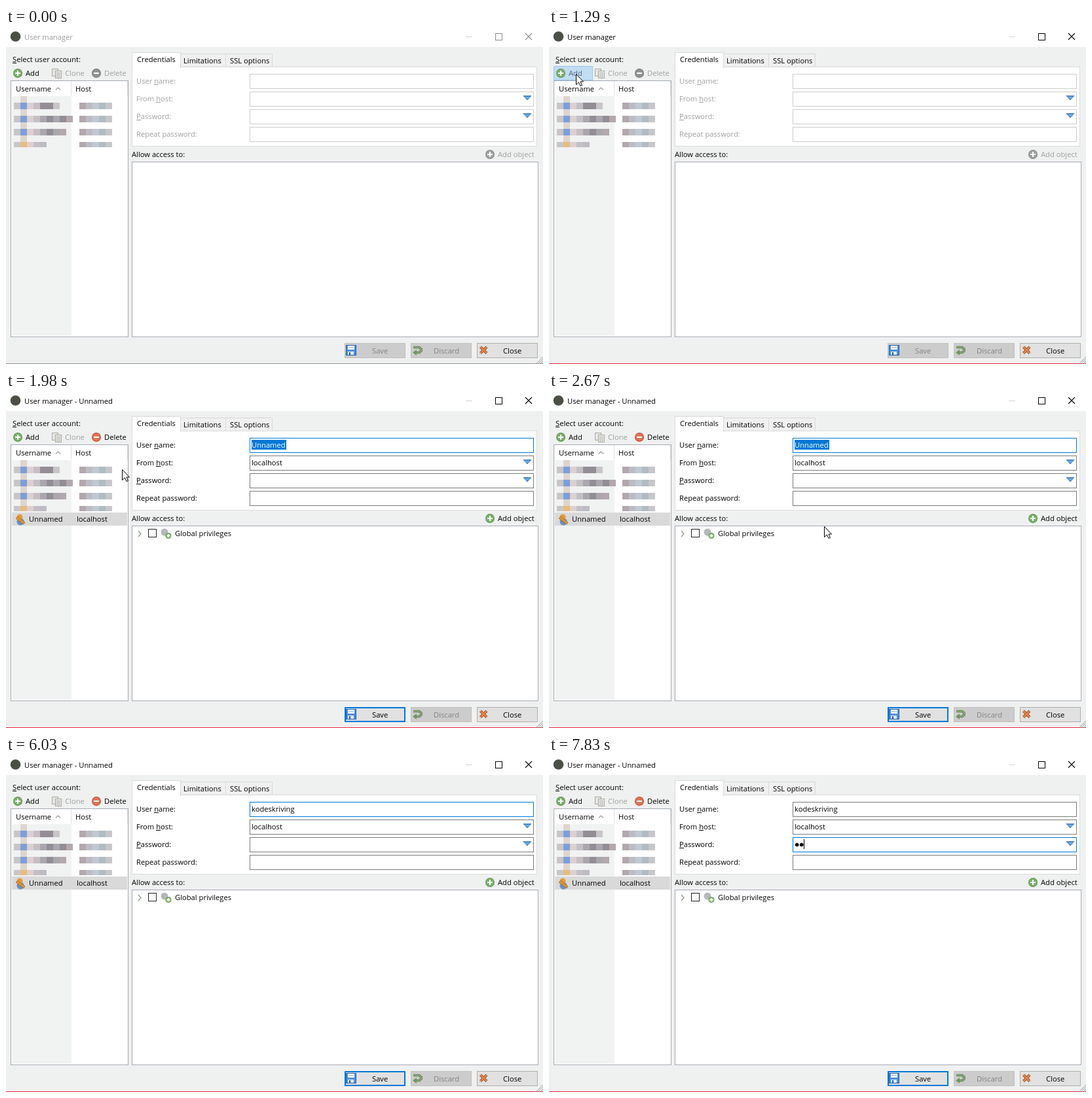
Animation of 820x513 px, one loop 8000 ms. Source, as an HTML page with a canvas:

```html
<!DOCTYPE html>
<html lang="en">
<head>
<meta charset="utf-8">
<title>User manager</title>
<style>
html, body { margin: 0; width: 820px; height: 513px; overflow: hidden; background: #eff0f0; }
canvas { display: block; }
</style>
</head>
<body>
<canvas id="stage" width="820" height="513"></canvas>
<script>
const c = document.getElementById('stage').getContext('2d');
const LOOP = 8000, ACTIVATE = 1210, ADDED = 1440, TO_HOST = 6410, TO_PASSWORD = 7130;
const BLUE = '#0078d7', BLACK = '#000', GRAY = '#a0a0a0';

// '<' is a backspace
const keys = 'kodeskir<<riving';
const keyTimes = [2900, 3070, 3220, 3450, 3600, 3850, 3920, 4150,
  4380, 4610, 4840, 5010, 5080, 5310, 5390, 5540];
const path = [[130, 684, 498], [750, 93, 80], [900, 70, 72], [980, 50, 70], [1060, 41, 70],
  [1650, 41, 70], [2210, 275, 153], [2600, 420, 205]];
const mosaic = { a: '#c9c5c7', b: '#7b9fdc', c: '#dfcfce', d: '#c3bfc5', e: '#938e96',
  f: '#aaa6ae', g: '#b3a8ae', h: '#bdbcc4', i: '#c2c8d2', j: '#b0bcc2', k: '#c6c6cb', o: '#e6bc82' };

const ramp = (t, from, length) => Math.min(1, Math.max(0, (t - from) / length));
const rgb = hex => [1, 3, 5].map(i => parseInt(hex.slice(i, i + 2), 16));
function mix(from, to, p) {
  const a = rgb(from), b = rgb(to);
  return `rgb(${a.map((v, i) => Math.round(v + (b[i] - v) * p))})`;
}
function rect(x, y, w, h, fill) {
  c.fillStyle = fill;
  c.fillRect(x, y, w, h);
}
function box(x, y, w, h, fill, border, line = 1) {
  rect(x, y, w, h, border);
  rect(x + line, y + line, w - 2 * line, h - 2 * line, fill);
}
function disc(x, y, r, fill) {
  c.fillStyle = fill;
  c.beginPath();
  c.arc(x, y, r, 0, 7);
  c.fill();
}
function poly(points, { fill, stroke, width = 1 }) {
  c.beginPath();
  points.forEach(([x, y]) => c.lineTo(x, y));
  if (fill) { c.closePath(); c.fillStyle = fill; c.fill(); }
  if (stroke) { c.strokeStyle = stroke; c.lineWidth = width; c.stroke(); }
}
// '_' underlines the next letter
function text(label, x, y, color = BLACK) {
  const at = label.indexOf('_'), plain = label.replace('_', '');
  c.fillStyle = color;
  c.fillText(plain, x, y);
  if (at >= 0) {
    const left = c.measureText(plain.slice(0, at)).width;
    c.fillRect(Math.round(x + left), y + 1, Math.round(c.measureText(plain[at]).width), 1);
  }
}
function faded(alpha, draw) {
  c.save();
  c.globalAlpha *= alpha;
  draw();
  c.restore();
}
function roundIcon(x, y, color, plus, r = 7) {
  disc(x, y, r, color);
  disc(x, y, r - 1.2, 'rgba(255,255,255,.22)');
  const n = r * .55;
  rect(x - n, y - 1, 2 * n, 2, '#fff');
  if (plus) rect(x - 1, y - n, 2, 2 * n, '#fff');
}
function cross(x, y, size, stroke, width) {
  poly([[x, y], [x + size, y + size]], { stroke, width });
  poly([[x + size, y], [x, y + size]], { stroke, width });
}

function drawTitle(t) {
  const active = t >= ACTIVATE, ink = active ? BLACK : '#8c8c8c';
  rect(0, 0, 820, 29, '#fff');
  disc(14.5, 13, 7.8, '#4a5044');
  text('User manager' + (t >= ADDED ? ' - Unnamed' : ''), 28, 18, active ? BLACK : '#999');
  rect(702, 13, 10, 1, '#d4d4d4');
  box(747, 8, 11, 11, '#fff', ink);
  cross(793, 8, 10, ink, 1.1);
  rect(0, 511, 820, 1, '#f8f4f4');
  rect(0, 512, 820, 1, active ? '#e0243c' : '#879390');
  for (let i = 0; i < 4; i++)
    poly([[820, 502 + i * 3], [809 + i * 3, 513]], { stroke: '#a0a0a0' });
}

function drawToolbar(t, enabled) {
  const hot = ramp(t, 960, 150) * (1 - ramp(t, 1700, 250));
  text('_Select user account:', 10, 52);
  faded(hot, () => box(7, 58, 60, 22, '#c0ddf4', '#98c6ea'));
  roundIcon(18, 69, '#5d9b4c', true);
  text('Add', 30, 73, t > 1290 && t < 1750 ? '#56697a' : BLACK);
  for (const [x, y] of [[70, 62], [75, 65]]) box(x, y, 10, 12, '#e6e6e4', '#aaa9a3');
  for (let y = 68; y < 76; y += 2) rect(77, y, 6, 1, '#bcbcb8');
  text('Clone', 90, 73, GRAY);
  roundIcon(138, 69, mix('#777777', '#d2512f', enabled), false);
  text('Delete', 150, 73, mix(GRAY, '#000000', Math.min(1, enabled * 1.7)));
}

function drawAccounts(t) {
  const hover = ramp(t, 590, 120) * (1 - ramp(t, 800, 100));
  box(7, 80, 180, 392, '#fff', '#a5abb2');
  rect(9, 104, 91, 366, '#f1f2f2');
  faded(hover, () => rect(9, 81, 90, 23, '#d9ebf9'));
  rect(99, 81, 1, 22, '#dedede');
  rect(185, 81, 1, 22, '#e5e5e5');
  text('Username', 15, 97);
  text('Host', 106, 97);
  poly([[76, 94.5], [79.5, 91], [83, 94.5]], { stroke: '#555' });
  rect(22, 104, 10, 70, '#ded5cd');
  ['abcdeea', 'abcdfefeg', 'abcdfefg', 'aocdh'].forEach((row, r) => {
    const y = 114 + r * 20, h = r < 3 ? 10 : 8;
    [...row].forEach((k, i) => rect(12 + i * 10, y, 10, h, mosaic[k]));
    [...'ghijk'].forEach((k, i) => rect(112 + i * 10, y, 10, h, mosaic[k]));
  });
  if (t < ADDED) return;
  rect(9, 184, 176, 20, '#d9d9d9');
  disc(22, 198, 5.5, '#6b8fc0');
  disc(21, 191, 4.5, '#e39a3d');
  poly([[15, 193], [18, 190], [29, 199], [27, 202]], { fill: '#dd9436', stroke: '#8a5a20', width: .6 });
  text('Unnamed', 35, 198);
  text('localhost', 108, 198);
}

function typed(t) {
  let value = '';
  keyTimes.forEach((time, i) => {
    if (t >= time) value = keys[i] === '<' ? value.slice(0, -1) : value + keys[i];
  });
  return value;
}
function fieldText(value, y, { selected, caret }) {
  const width = c.measureText(value).width;
  if (selected) rect(375, y - 12, Math.round(width) + 1, 15, BLUE);
  text(value, 375, y, selected ? '#fff' : BLACK);
  if (caret) rect(Math.round(375 + width), y - 12, 1, 15, BLACK);
}

function drawCredentials(t) {
  const added = t >= ADDED;
  box(192, 59, 619, 122, '#fff', '#dcdcdc');
  box(266, 39, 70, 21, '#f0f0f0', '#d9d9d9');
  box(335, 39, 72, 21, '#f0f0f0', '#d9d9d9');
  box(192, 37, 75, 24, '#fff', '#d9d9d9');
  rect(193, 59, 73, 3, '#fff');
  text('Credentials', 200, 52);
  text('Limitations', 271, 54);
  text('SSL options', 342, 54);

  const hostIn = ramp(t, TO_HOST - 40, 280), passwordIn = ramp(t, TO_PASSWORD - 40, 340);
  const focus = [1 - hostIn, hostIn * (1 - passwordIn), passwordIn, 0];
  ['User _name:', 'From _host:', '_Password:', 'Repeat password:'].forEach((label, i) => {
    const y = 70 + i * 27;
    text(label, 199, y + 15, added ? BLACK : GRAY);
    box(372, y, 434, 23, '#fff', added ? mix('#7a7a7a', BLUE, focus[i]) : '#cccccc');
    if (i === 1 || i === 2) {
      const shade = c.createLinearGradient(0, y + 6, 0, y + 13);
      shade.addColorStop(0, '#2f74c4');
      shade.addColorStop(.5, '#74b4ee');
      shade.addColorStop(1, '#2f74c4');
      poly([[790, y + 6.5], [802, y + 6.5], [796, y + 13]], { fill: shade, stroke: '#2f70ba', width: .7 });
    }
  });
  if (!added) return;
  const typing = t >= keyTimes[0];
  fieldText(typing ? typed(t) : 'Unnamed', 85, { selected: !typing, caret: typing && t < 6030 });
  fieldText('localhost', 112, { selected: t >= TO_HOST && t < TO_PASSWORD });
  if (t >= TO_PASSWORD) {
    const dots = (t >= 7750) + (t >= 7830);
    for (let i = 0; i < dots; i++) disc(378.7 + i * 7, 135.5, 2.8, BLACK);
    rect(375 + dots * 7, 127, 1, 15, BLACK);
  }
}

function drawObjects(t, enabled) {
  text('Allow access to:', 192, 197);
  roundIcon(739, 193, mix('#8a8a8a', '#5d9b4c', enabled), true);
  text('Add object', 751, 197, t >= ADDED ? BLACK : GRAY);
  box(192, 204, 621, 268, '#fff', '#a5abb2');
  if (t < ADDED) return;
  poly([[202, 212], [206, 216.5], [202, 221]], { stroke: '#98a08c', width: 1.5 });
  box(217, 209, 13, 13, '#fff', '#222');
  disc(242, 214, 5.5, '#b4b8bb');
  roundIcon(248, 219.5, '#67a350', true, 4.5);
  text('Global privileges', 258, 220);
}

function drawButtons(enabled) {
  const button = (x, label, labelX, p) => {
    box(x, 481, 93, 23, mix('#cccccc', '#e1e1e1', p), p ? '#adadad' : '#bfbfbf');
    text(label, labelX, 497, mix('#838383', '#000000', p * p));
  };
  button(517, 'Save', 559, enabled);
  faded(enabled, () => {
    c.strokeStyle = BLUE;
    c.lineWidth = 2;
    c.strokeRect(518, 482, 91, 21);
  });
  box(519, 484, 16, 16, '#4c8fdc', '#1f5fae');
  rect(522, 485, 10, 6, '#f4f8fc');
  rect(523, 487, 8, 1, '#9ab4d0');
  rect(522, 494, 9, 5, '#dfe9f4');
  rect(524, 495, 2, 4, '#1f5fae');

  button(618, 'Discard', 653, 0);
  const arrow = [[622, 487.5], [631, 487.5], [634, 490], [634, 493], [631, 495.5], [625, 495.5]];
  poly(arrow, { stroke: '#5f8250', width: 3.6 });
  poly(arrow, { stroke: '#8fb07d', width: 1.6 });
  poly([[621, 495.5], [627, 491], [627, 500]], { fill: '#719461' });

  button(719, 'Close', 759, 1);
  cross(724.5, 487, 9.5, '#8f4a25', 4);
  cross(724.5, 487, 9.5, '#e8894d', 2.4);
}

function drawPointer(t) {
  if (t < 126 || t >= keyTimes[0]) return;
  // The pointer is sampled 13 times a second
  const step = 1000 / 13, time = 130 + Math.floor((t - 126) / step) * step;
  let next = path.findIndex(p => p[0] > time);
  if (next < 0) next = path.length;
  const a = path[next - 1], b = path[next] || a;
  let u = ramp(time, a[0], b[0] - a[0] || 1);
  if (next === 1 || next === path.length - 1) u = 1 - (1 - u) ** 2;
  const x = Math.round(a[1] + (b[1] - a[1]) * u) + .5, y = Math.round(a[2] + (b[2] - a[2]) * u) + .5;
  const shape = [[0, 0], [0, 16], [4, 12.5], [6.5, 18], [9, 17], [6.5, 11.5], [11, 11.5], [0, 0]];
  poly(shape.map(([dx, dy]) => [x + dx, y + dy]), { fill: '#fff', stroke: BLACK });
}

function frame(now) {
  const t = now % LOOP, enabled = ramp(t, ADDED, 300);
  c.font = '11.2px "Open Sans", "Noto Sans", sans-serif';
  rect(0, 0, 820, 513, '#eff0f0');
  drawTitle(t);
  drawToolbar(t, enabled);
  drawAccounts(t);
  drawCredentials(t);
  drawObjects(t, enabled);
  drawButtons(enabled);
  drawPointer(t);
  requestAnimationFrame(frame);
}
requestAnimationFrame(frame);
</script>
</body>
</html>
```
